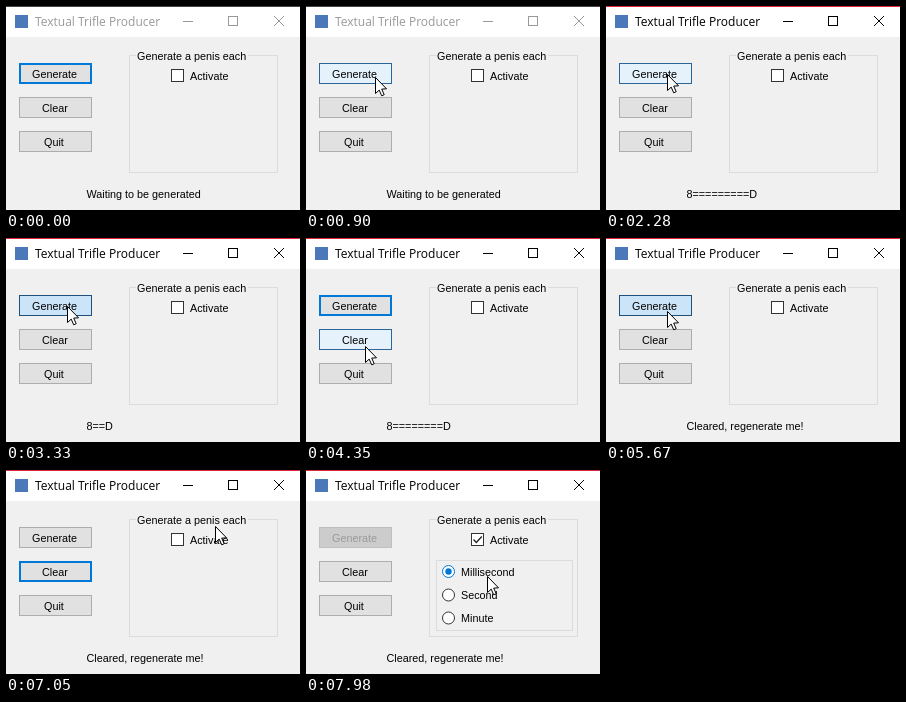
Write an HTML page with a canvas that moves like this. It is 294 px wide and 204 px high and loops after 8 s.

```html
<!DOCTYPE html>
<html lang="en">
<head>
<meta charset="utf-8">
<title>Textual Trifle Producer</title>
<style>
  html, body { margin: 0; width: 100%; height: 100%; overflow: hidden; background: #f0f0f0; }
  canvas { display: block; width: 294px; height: 204px; }
</style>
</head>
<body>
<canvas id="stage" width="294" height="204"></canvas>
<script>
const g = document.getElementById('stage').getContext('2d');
const LOOP = 8000, STEP = 30;
const UI = '10.8px "Liberation Sans", Arial, sans-serif';
const TITLE = '12px "Open Sans", "Noto Sans", sans-serif';

const shaft = n => '8' + '='.repeat(n) + 'D';
const CLEARED = 'Cleared, regenerate me!';

// press time, release time, control, status text after release
const clicks = [
  [1080, 1200, 'gen', shaft(10)],
  [1530, 1620, 'gen', shaft(6)],
  [1890, 1980, 'gen', shaft(3)],
  [2190, 2280, 'gen', shaft(9)],
  [2550, 2670, 'gen', shaft(5)],
  [2850, 2970, 'gen', shaft(2)],
  [3240, 3360, 'gen', shaft(4)],
  [3630, 3780, 'gen', shaft(8)],
  [4530, 4620, 'clear', CLEARED],
  [5670, 5730, 'gen', shaft(7)],
  [5910, 5970, 'gen', shaft(3)],
  [6510, 6600, 'clear', CLEARED],
  [7320, 7380, 'check', CLEARED],
  [7920, 7980, 'radio', CLEARED]
];

// time, x, y of the pointer tip
const path = [
  [210, 288, 86], [450, 200, 62], [600, 135, 54], [780, 86, 64],
  [900, 69, 71], [990, 61, 68], [4170, 61, 68], [4260, 60, 92],
  [4350, 59, 108], [5010, 59, 108], [5040, 59, 107], [5250, 59, 107],
  [5520, 61, 73], [6210, 61, 73], [6300, 61, 101], [6690, 61, 101],
  [6870, 128, 74], [7050, 209, 56], [7230, 172, 69], [7440, 172, 69],
  [7680, 181, 106]
];

const buttons = [
  { id: 'gen', label: 'Generate', x: 26, y: 57 },
  { id: 'clear', label: 'Clear', x: 36, y: 91 },
  { id: 'quit', label: 'Quit', x: 38, y: 125 }
];

function pointer(t) {
  if (t < path[0][0]) return null;
  const i = path.findIndex(p => p[0] > t);
  if (i < 0) return path[path.length - 1].slice(1);
  const a = path[i - 1], b = path[i], k = (t - a[0]) / (b[0] - a[0]);
  return [1, 2].map(j => Math.round(a[j] + (b[j] - a[j]) * k));
}

function stateAt(t) {
  const s = { focus: 'gen', pressed: '', status: 'Waiting to be generated',
              active: t >= 1080, checked: t >= 7380, chosen: t >= 7980 };
  for (const [down, up, id, status] of clicks) {
    if (t < down) break;
    s.focus = id;
    if (t < up) s.pressed = id;
    else s.status = status;
  }
  s.tip = pointer(t);
  return s;
}

function inside(tip, x, y, w, h) {
  return tip && tip[0] >= x && tip[0] < x + w && tip[1] >= y && tip[1] < y + h;
}

function fill(color, x, y, w, h) {
  g.fillStyle = color;
  g.fillRect(x, y, w, h);
}

function frame(color, x, y, w, h, line = 1) {
  g.strokeStyle = color;
  g.lineWidth = line;
  g.strokeRect(x + line / 2, y + line / 2, w - line, h - line);
}

function text(str, x, y, color = '#000', font = UI) {
  g.font = font;
  g.fillStyle = color;
  g.fillText(str, x, y);
}

function trace(points, closed) {
  g.beginPath();
  points.forEach(([x, y]) => g.lineTo(x, y));
  if (closed) g.closePath();
}

function titleBar(active) {
  const ink = active ? '#000' : '#999';
  fill('#fff', 0, 0, 294, 31);
  fill(active ? '#e0263c' : '#444', 0, 0, 294, 1);
  fill('#4a78b8', 9, 9, 13, 13);
  text('Textual Trifle Producer', 29, 20, ink, TITLE);
  fill(ink, 177, 15, 10, 1);
  frame(ink, 222, 10, 10, 10);
  g.strokeStyle = ink;
  g.lineWidth = 1;
  for (const [a, b] of [[10, 20], [20, 10]]) {
    trace([[268, a], [278, b]]);
    g.stroke();
  }
}

function button(b, s) {
  const { id, y } = b, box = [13, y, 73, 21];
  let face = '#e1e1e1', edge = '#adadad', ink = '#000', line = 1;
  if (id === 'gen' && s.checked) {
    face = '#ccc'; edge = '#bfbfbf'; ink = '#9a9a9a';
  } else if (s.pressed === id) {
    face = '#cce4f7'; edge = '#20507c';
  } else if (inside(s.tip, ...box)) {
    face = '#e5f1fb'; edge = '#2b659a';
  } else if (s.focus === id) {
    edge = '#0078d7'; line = 2;
  }
  fill(face, ...box);
  frame(edge, ...box, line);
  text(b.label, b.x, y + 15, ink);
}

function checkbox(s) {
  const hot = inside(s.tip, 164, 62, 62, 16);
  fill(s.pressed === 'check' ? '#cce4f7' : '#fff', 165, 63, 13, 13);
  frame(hot ? '#0078d7' : '#333', 165, 63, 13, 13);
  if (s.checked) {
    g.strokeStyle = hot ? '#0078d7' : '#222';
    g.lineWidth = 1.3;
    trace([[167.5, 69.5], [170.3, 72.5], [175.8, 66.5]]);
    g.stroke();
  }
  text('Activate', 184, 74);
}

function radios(s) {
  frame('#dcdcdc', 130, 90, 137, 71);
  ['Millisecond', 'Second', 'Minute'].forEach((label, i) => {
    const y = [101.5, 125, 148][i];
    const hot = inside(s.tip, 135, y - 8, 75, 16);
    g.beginPath();
    g.arc(142.5, y, 6, 0, 7);
    g.fillStyle = i === 0 && s.pressed === 'radio' ? '#cce4f7' : '#fff';
    g.fill();
    g.strokeStyle = hot ? '#0078d7' : '#333';
    g.lineWidth = 1;
    g.stroke();
    if (i === 0 && s.chosen) {
      g.beginPath();
      g.arc(142.5, y, 3.2, 0, 7);
      g.fillStyle = '#0078d7';
      g.fill();
    }
    text(label, 155, Math.round(y + 4));
  });
}

function arrow([x, y]) {
  g.save();
  g.translate(x + 0.5, y + 0.5);
  trace([[0, 0], [0, 16], [3.7, 12.6], [6.2, 18.3], [8.7, 17.2], [6.2, 11.6], [11, 11.3]], true);
  g.fillStyle = '#fff';
  g.fill();
  g.strokeStyle = '#000';
  g.lineWidth = 1;
  g.stroke();
  g.restore();
}

function draw(t) {
  const s = stateAt(t);
  fill('#f0f0f0', 0, 0, 294, 204);
  titleBar(s.active);
  buttons.forEach(b => button(b, s));
  frame('#dcdcdc', 123, 49, 149, 118);
  fill('#f0f0f0', 130, 48, 112, 3);
  text('Generate a penis each', 131, 54);
  checkbox(s);
  if (s.checked) radios(s);
  text(s.status, 80.5, 192);
  if (s.tip) arrow(s.tip);
}

const start = performance.now();
function tick() {
  const t = (performance.now() - start) % LOOP;
  draw(Math.floor(t / STEP) * STEP);
  requestAnimationFrame(tick);
}
tick();
</script>
</body>
</html>
```
